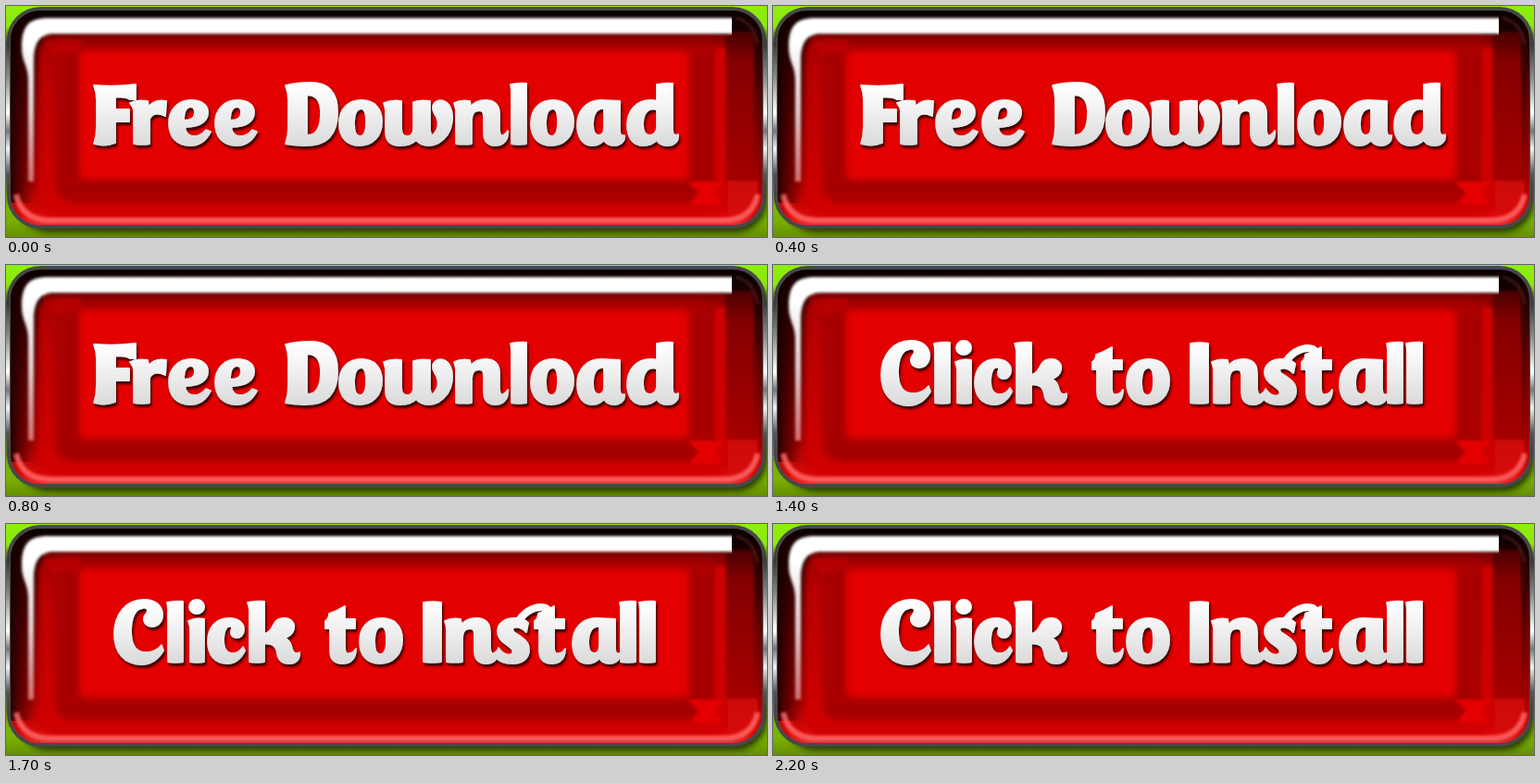
These frames come from a looping animation (822 px wide and 250 px high, 2700 ms). An HTML page:

```html
<!DOCTYPE html>
<html lang="en">
<head>
<meta charset="utf-8">
<title>Free Download</title>
<style>
  html, body { margin: 0; width: 100%; height: 100%; overflow: hidden; background: #7fc400; }
  svg { display: block; width: 822px; height: 250px; }
</style>
</head>
<body>
<svg viewBox="0 0 822 250" width="822" height="250">
  <defs>
    <linearGradient id="lime" x2="0" y2="1">
      <stop offset="0" stop-color="#8eee0c"/>
      <stop offset=".5" stop-color="#80cc08"/>
      <stop offset=".93" stop-color="#78b000"/>
      <stop offset="1" stop-color="#668e00"/>
    </linearGradient>
    <linearGradient id="chrome" x2="0" y2="1">
      <stop offset="0" stop-color="#333" stop-opacity="0"/>
      <stop offset=".1" stop-color="#3c3c3c"/>
      <stop offset=".28" stop-color="#8a8a8a"/>
      <stop offset=".48" stop-color="#fff"/>
      <stop offset=".58" stop-color="#777"/>
      <stop offset=".68" stop-color="#f0f0f0"/>
      <stop offset=".82" stop-color="#555"/>
      <stop offset="1" stop-color="#333" stop-opacity="0"/>
    </linearGradient>
    <linearGradient id="shell" x2="0" y2="1">
      <stop offset="0" stop-color="#080000"/>
      <stop offset=".12" stop-color="#1c0000"/>
      <stop offset=".45" stop-color="#640000"/>
      <stop offset=".8" stop-color="#a00000"/>
      <stop offset=".95" stop-color="#dc0808"/>
      <stop offset="1" stop-color="#e83030"/>
    </linearGradient>
    <linearGradient id="rim" x2="0" y2="1">
      <stop offset="0" stop-color="#960000"/>
      <stop offset=".2" stop-color="#b80000"/>
      <stop offset="1" stop-color="#d20000"/>
    </linearGradient>
    <linearGradient id="side" x2="0" y2="1">
      <stop offset="0" stop-color="#480000"/>
      <stop offset=".2" stop-color="#840000"/>
      <stop offset="1" stop-color="#a60000"/>
    </linearGradient>
    <linearGradient id="top" x2="0" y2="1">
      <stop offset="0" stop-color="#780000"/>
      <stop offset="1" stop-color="#c80000" stop-opacity="0"/>
    </linearGradient>
    <linearGradient id="dusk">
      <stop offset="0" stop-color="#100000" stop-opacity=".85"/>
      <stop offset="1" stop-color="#300000" stop-opacity="0"/>
    </linearGradient>
    <linearGradient id="gleam" gradientUnits="userSpaceOnUse" x1="0" y1="40" x2="0" y2="192">
      <stop offset="0" stop-color="#fff"/>
      <stop offset=".5" stop-color="#fff" stop-opacity=".8"/>
      <stop offset="1" stop-color="#ffb8b8" stop-opacity=".6"/>
    </linearGradient>
    <linearGradient id="ink" gradientUnits="userSpaceOnUse" x1="0" y1="84" x2="0" y2="151">
      <stop offset="0" stop-color="#fff"/>
      <stop offset=".3" stop-color="#f6f6f6"/>
      <stop offset="1" stop-color="#dadada"/>
    </linearGradient>
    <filter id="soft" x="-10%" y="-30%" width="120%" height="160%"><feGaussianBlur stdDeviation="3"/></filter>
    <filter id="fine" x="-10%" y="-30%" width="120%" height="160%"><feGaussianBlur stdDeviation="1.6"/></filter>
    <filter id="shade" filterUnits="userSpaceOnUse" x="80" y="70" width="670" height="100">
      <feDropShadow dx="1.5" dy="3" stdDeviation="1.3" flood-color="#200000" flood-opacity=".9"/>
    </filter>
    <clipPath id="inside"><rect x="5" y="5" width="812" height="232" rx="32"/></clipPath>
    <clipPath id="cut"><rect width="784" height="250"/></clipPath>
  </defs>

  <rect width="822" height="250" fill="url(#lime)"/>
  <rect x="12" y="14" width="810" height="231" rx="34" fill="#1c2c00" opacity=".85" filter="url(#soft)"/>

  <rect x="3" y="3" width="816" height="236" rx="34" fill="url(#shell)" stroke="#484848" stroke-width="4"/>
  <rect y="22" width="4" height="195" fill="url(#chrome)"/>
  <rect x="818" y="22" width="4" height="195" fill="url(#chrome)"/>
  <g clip-path="url(#inside)">
    <rect x="5" y="5" width="26" height="208" fill="url(#dusk)"/>
    <rect x="34" y="30" width="747" height="198" rx="22" fill="url(#rim)" filter="url(#soft)"/>
    <rect x="53" y="34" width="713" height="179" rx="20" fill="#a80000" filter="url(#soft)"/>
    <rect x="79" y="47" width="659" height="141" rx="7" fill="#e20000" filter="url(#soft)"/>
    <rect x="40" y="31" width="740" height="24" fill="url(#top)"/>
    <g filter="url(#fine)">
      <path d="M42 40Q60 32 82 38L80 50Q66 46 52 56Z" fill="#c40000" opacity=".6"/>
      <rect x="766" y="46" width="11" height="142" fill="#cc0000"/>
      <rect x="778" y="28" width="30" height="161" fill="url(#side)"/>
      <path d="M736 190H776L766 202L774 215H738L748 202Z" fill="#e40000"/>
    </g>
    <path d="M779 189H812V206Q806 228 780 228Z" fill="#d80808" opacity=".8" filter="url(#fine)"/>
    <path d="M11 204Q17 232 48 232H775Q806 232 812 204" fill="none" stroke="#ff6868" stroke-width="6" opacity=".85" filter="url(#fine)"/>
    <path d="M788 13Q808 17 812 42" fill="none" stroke="#6a3030" stroke-width="2" opacity=".7" filter="url(#fine)"/>
  </g>
  <g clip-path="url(#cut)">
    <path d="M17 45C17 22 24 13 46 13H800V30H50C36 31 31 40 30 56V190H24V80C24 65 17 60 17 45Z" fill="url(#gleam)" filter="url(#fine)"/>
  </g>
  <g id="words" fill="url(#ink)" fill-rule="evenodd" stroke="url(#ink)" stroke-width="1.800" stroke-linejoin="round"></g>
</svg>
<script>
const bowlA = "M29 111C21 110 17 117 17 128C17 136 19 140 23 140C27 140 29 136 29 131Z";
const glyphs = {
  F: "M0 86C15 87 30 87 45 85V101H39C37 99 34 98 23 98V112H38V125H23V148C16 151 7 151 0 149C2 143 3 137 3 130V102C3 96 2 91 0 86Z",
  r: "M0 105C6 102 13 102 19 103L20 109C24 104 30 101 39 103L38 119C30 115 24 116 21 122V149C15 150 8 150 4 149V113C4 109 2 108 0 105Z",
  e: "M45 136C40 146 32 151 23 151C9 151 0 142 0 127C0 112 10 102 24 102C35 102 42 107 42 115C42 125 33 131 17 131C18 138 22 141 27 141C33 141 37 138 40 134ZM16 124C24 124 28 121 28 115C28 111 26 109 23.500 109C18 109 16 115 16 124Z",
  D: "M0 86C8 84 16 83 27 83C46 83 56 94 56 115C56 138 45 151 22 151C14 151 7 150 0 149C2 143 3 137 3 130V102C3 96 2 91 0 86ZM23 96V140C33 140 38 132 38 116C38 103 34 96 23 96Z",
  o: "M24 102C38 102 46 111 46 125C46 141 36 151 22 151C8 151 0 142 0 127C0 112 9 102 24 102ZM24 111C18 111 16 118 16 127C16 136 18 141 22 141C27 141 29 135 29 126C29 116 28 111 24 111Z",
  w: "M0 105C7 102 13 102 19 103V132C19 138 21 141 25 141C30 141 32 138 32 133V104C38 102 44 102 50 103V133C50 139 52 141 54 139C59 134 60 126 57 120C53 114 51 108 56 104C61 100 69 103 72 110C76 120 74 131 69 139C63 147 57 151 49 151C42 151 38 149 35 145C31 149 24 151 18 151C7 151 2 146 2 136V114C2 110 1 108 0 105Z",
  n: "M0 105C6 102 12 102 17 103L18 109C22 104 28 102 34 102C44 102 49 108 49 118V134C49 139 51 141 53 140C55 139 57 137 58 135C59 145 53 151 45 151C36 151 32 146 32 137V120C32 115 31 113 27 113C22 113 19 117 19 123V149C13 150 8 150 2 149V114C2 110 1 108 0 105Z",
  l: "M0 85C6 84 12 83 17 84V149C12 150 6 150 1 149V94C1 90 1 88 0 85Z",
  a: "M46 103V134C46 139 47 141 51 140C52 147 46 151 40 151C35 151 31 149 29 145C26 149 21 151 16 151C6 151 0 142 0 129C0 113 10 102 26 102C33 102 39 103 46 103Z" + bowlA,
  d: "M32 85C38 84 43 83 49 84V134C49 139 51 141 55 139C56 147 50 151 43 151C38 151 34 149 32 145C28 149 23 151 17 151C6 151 0 142 0 129C0 113 10 102 25 102C28 102 30 102 32 103ZM32 112C22 109 17 117 17 128C17 136 19 140 24 140C29 140 32 136 32 131Z",
  C: "M53 137C47 147 38 152 29 152C11 152 0 139 0 119C0 97 13 82 32 82C45 82 52 89 52 98C52 106 47 111 41 111C35 111 31 107 32 101C33 98 36 96 36 94C36 91 33 90 30 91C22 92 18 102 18 116C18 131 24 139 34 139C41 139 47 136 51 131Z",
  i: "M0 105C6 102 12 102 17 103V149C12 150 7 150 2 149V114C2 110 1 108 0 105ZM9 82A8 7.500 0 1 1 9 97A8 7.500 0 1 1 9 82Z",
  c: "M40 137C35 147 29 151 21 151C8 151 0 142 0 127C0 112 9 102 23 102C33 102 39 107 39 114C39 120 35 123 31 123C27 123 24 120 25 116C26 114 27 112 25 111C20 109 17 116 17 126C17 136 21 140 27 140C32 140 35 138 38 133Z",
  k: "M0 85C6 84 12 83 18 84V119C24 117 26 113 28 109C30 104 35 101 41 102C48 103 51 108 50 113C49 119 44 122 39 123C45 125 47 129 48 135C49 140 52 141 56 139C57 147 51 151 45 151C37 151 33 147 32 140C31 133 28 129 18 129V149C12 150 7 150 2 149V94C2 90 1 88 0 85Z",
  t: "M4 97C10 95 16 92 21 89V103H32V113H21V134C21 139 23 141 26 140C29 140 31 138 33 135C33 145 28 151 19 151C10 151 5 146 5 137V113H0V105C3 103 4 100 4 97Z",
  I: "M0 85C7 84 13 84 19 85V149C13 150 6 150 0 149Z",
  s: "M2 134C6 140 11 142 15 141C19 140 18 136 14 133C7 128 1 124 1 116C1 107 9 102 19 102C26 102 31 104 34 107L32 117C28 113 23 111 19 112C16 113 17 116 20 118C28 123 35 127 35 136C35 146 27 151 17 151C9 151 3 149 0 145Z"
};
// Swash joining the s and the t
const swash = '<path d="M552 107C558 98 566 90 578 90C586 90 589 95 586 107" fill="none" stroke-width="8"/>';

function lettering(text, xs, extra = "") {
  const letters = text.replace(/ /g, "");
  const marks = xs.map((x, i) => `<path transform="translate(${x} 0)" d="${glyphs[letters[i]]}"/>`);
  return `<g role="img" aria-label="${text}" filter="url(#shade)">${marks.join("")}${extra}</g>`;
}

const words = document.getElementById("words");
words.innerHTML =
  lettering("Free Download", [95, 134, 176, 226, 302, 360, 408, 484, 545, 567, 617, 671]) +
  lettering("Click to Install", [117, 174, 197, 218, 261, 345, 382, 451, 474, 530, 571, 612, 663, 684], swash);
const [free, click] = words.children;

const LOOP = 2700;
const cues = [
  [0, free], [200, null], [400, free], [600, null], [800, free],
  [1400, click], [1500, null], [1700, click], [2000, null], [2200, click]
];

function draw(t) {
  const shown = cues.filter(([at]) => at <= t).pop()[1];
  for (const g of [free, click]) g.style.display = g === shown ? "" : "none";
}

const start = performance.now();
function tick() {
  draw((performance.now() - start) % LOOP);
  requestAnimationFrame(tick);
}
draw(0);
requestAnimationFrame(tick);
</script>
</body>
</html>
```
